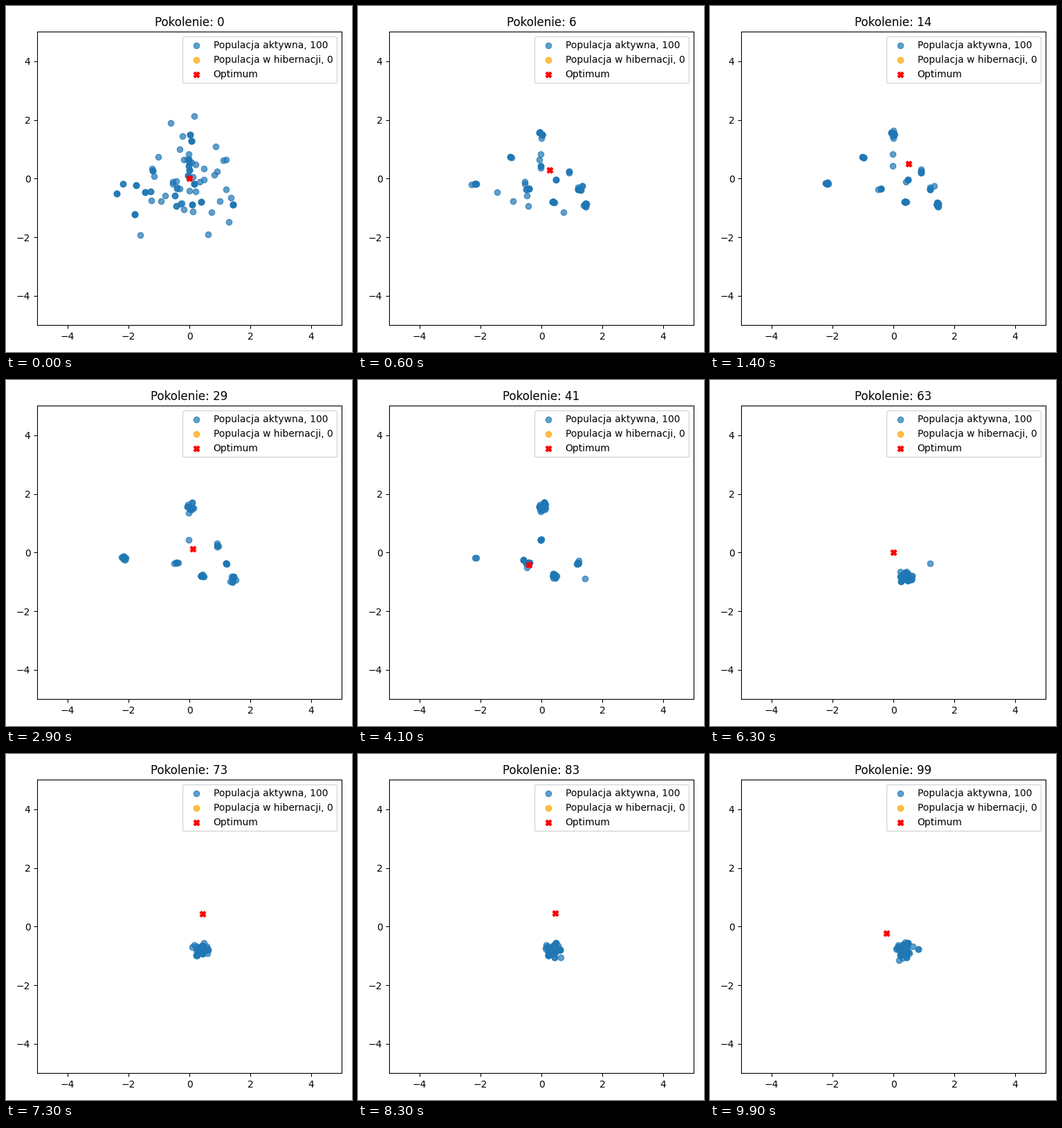
Write a matplotlib script that moves like this. It is 500 px wide and 500 px high and loops after 10000 ms.

```python
import matplotlib.pyplot as plt
import numpy as np
from matplotlib.animation import FuncAnimation

SIZE = 100
GENERATIONS = 100
FOUNDERS = 64
CLONED = 26

# Niches that attract the population: x, y, last generation
NICHES = np.array([
    (.38, -.79, 100),
    (-.42, -.34, 55),
    (-.02, .42, 48),
    (.03, 1.5, 46),
    (1.21, -.37, 45),
    (1.43, -.9, 33),
    (.9, .25, 32),
    (-2.18, -.19, 30),
    (.48, -.04, 18),
    (-1.02, .74, 17),
])


def evolve(seed):
    """Return the positions of all individuals in every generation."""
    rng = np.random.default_rng(seed)
    count = len(NICHES)
    centres = NICHES[:, :2]
    until = np.append(NICHES[:, 2], 0)  # the last entry is for wanderers

    wanderers = rng.normal(0, .95, (FOUNDERS - count, 2))
    origin = np.append(np.arange(FOUNDERS),
                       rng.integers(0, CLONED, SIZE - FOUNDERS))
    pop = np.vstack([centres, wanderers])[origin]
    home = np.minimum(origin, count)
    elite = np.arange(SIZE) < count

    history = [pop.copy()]
    for gen in range(1, GENERATIONS):
        expired = gen > until[home]
        chance = np.where(expired, .3, np.where(elite, 0, .1))
        out = np.flatnonzero(rng.random(SIZE) < chance)
        parents = rng.choice(np.flatnonzero(~expired), len(out))
        pop[out] = pop[parents]
        home[out] = home[parents]

        mutants = out[rng.random(len(out)) < .3]
        spread = .05 + .0008 * gen
        pop[mutants] = (centres[home[mutants]]
                        + rng.normal(0, spread, (len(mutants), 2)))
        history.append(pop.copy())
    return history


history = evolve(seed=7)

fig, ax = plt.subplots(figsize=(5, 5), dpi=100)
ax.set(xlim=(-5, 5), ylim=(-5, 5))
title = ax.set_title("Pokolenie: 0")
active = ax.scatter([], [], color="tab:blue", alpha=.7,
                    label=f"Populacja aktywna, {SIZE}")
ax.scatter([], [], color="orange", alpha=.7,
           label="Populacja w hibernacji, 0")
optimum = ax.scatter([0], [0], color="red", marker="X", label="Optimum")
ax.legend(loc="upper right")
fig.tight_layout()


def update(gen):
    title.set_text(f"Pokolenie: {gen}")
    active.set_offsets(history[gen])
    shift = .5 * np.sin(.1 * gen)
    optimum.set_offsets([(shift, shift)])
    return title, active, optimum


anim = FuncAnimation(fig, update, frames=GENERATIONS, interval=100,
                     repeat=True, repeat_delay=0)
plt.show()
```
